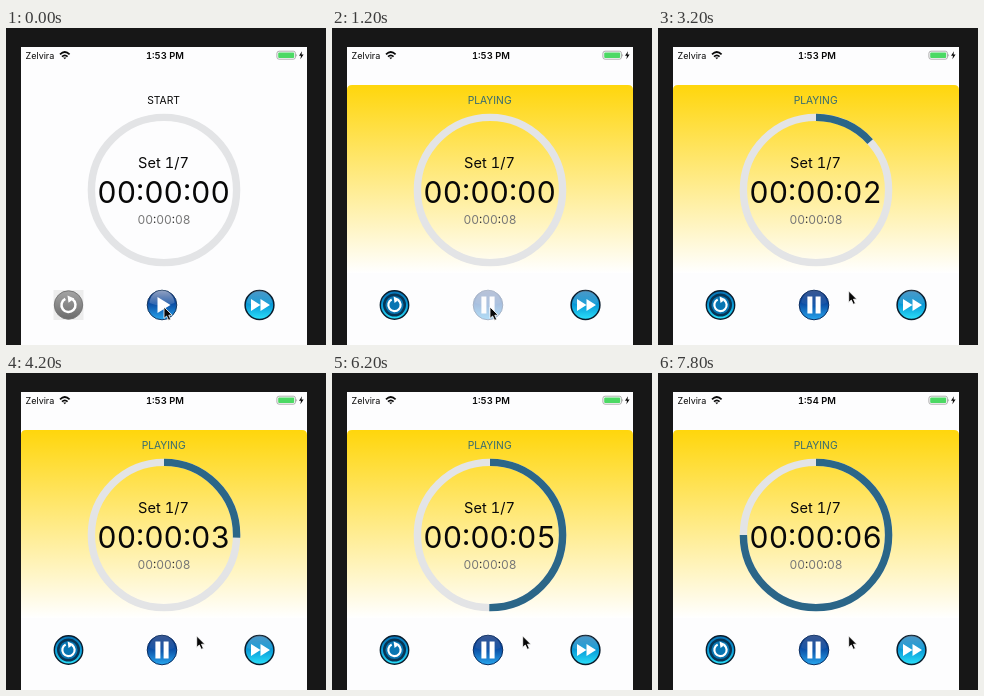
An HTML page that plays this animation: 320 by 317 pixels, repeating every 8 s.

```html
<!DOCTYPE html>
<html lang="en">
<head>
<meta charset="utf-8">
<title>Interval timer</title>
<style>
  html, body { margin: 0; width: 100%; height: 100%; overflow: hidden; background: #171717; }
  svg { display: block; width: 100%; height: 100%; }
  text { font-family: Inter, Roboto, sans-serif; font-variant-numeric: tabular-nums; fill: #080808; }
  .mid { text-anchor: middle; }
  .ring { fill: none; stroke-width: 7.4; }
</style>
</head>
<body>
<svg viewBox="0 0 320 317" preserveAspectRatio="none">
  <defs>
    <linearGradient id="gold" x2="0" y2="1">
      <stop stop-color="#ffd60c"/><stop offset="1" stop-color="#fff"/>
    </linearGradient>
    <linearGradient id="navy" x2="0" y2="1">
      <stop stop-color="#0a2f78"/><stop offset=".45" stop-color="#0b4ca3"/><stop offset="1" stop-color="#27a6ee"/>
    </linearGradient>
    <linearGradient id="cyan" x2="0" y2="1">
      <stop stop-color="#0872b4"/><stop offset=".5" stop-color="#0a9bd8"/><stop offset="1" stop-color="#2be0fa"/>
    </linearGradient>
    <linearGradient id="gray" x2="0" y2="1">
      <stop stop-color="#a4a4a4"/><stop offset="1" stop-color="#6c6c6c"/>
    </linearGradient>
    <linearGradient id="gloss" x2="0" y2="1">
      <stop stop-color="#fff" stop-opacity=".55"/><stop offset="1" stop-color="#fff" stop-opacity=".12"/>
    </linearGradient>
    <path id="shine" d="M-12.5-2A12.5 12.5 0 0 1 12.5-2Q0 3-12.5-2Z" fill="url(#gloss)"/>
    <g id="reload">
      <path d="M-3.2-6.2A7 7 0 1 0 4-5.7" fill="none" stroke="#fff" stroke-width="2.5"/>
      <path d="M-1-9.6L5.8-6.4L0-2.2Z" fill="#fff"/>
    </g>
  </defs>

  <rect width="320" height="317" fill="#171717"/>
  <rect x="15" y="19" width="286" height="298" fill="#fdfdfe"/>
  <path id="panel" d="M15 245V62Q15 57 20 57H296Q301 57 301 62V245Z" fill="url(#gold)"/>

  <text x="19.5" y="30.5" font-size="9">Zelvira</text>
  <g fill="none" stroke="#080808" stroke-width="1.7">
    <path d="M54 26.3Q58.8 21.7 63.6 26.3M56 28.6Q58.8 26 61.6 28.6"/>
    <path d="M57.2 29.4H60.4L58.8 31.2Z" fill="#080808" stroke="none"/>
  </g>
  <text id="clock" class="mid" x="159" y="30.7" font-size="9.4" font-weight="600"></text>
  <rect x="270.9" y="23.2" width="18.6" height="8" rx="2.2" fill="none" stroke="#9b9b9b" stroke-width=".8"/>
  <rect x="272.2" y="24.5" width="16" height="5.4" rx="1" fill="#4cd964"/>
  <path d="M290.4 25.7Q292 27.2 290.4 28.7Z" fill="#9b9b9b"/>
  <path d="M296 23.2L293 27.8H295L294.4 31.2L297.6 26.5H295.5Z" fill="#080808"/>

  <text id="state" class="mid" x="157.6" y="75.7" font-size="10.3"></text>
  <circle class="ring" cx="158" cy="162" r="72.6" stroke="#e3e4e6"/>
  <circle id="arc" class="ring" cx="158" cy="162" r="72.6" stroke="#2b6688" pathLength="360" transform="rotate(-90 158 162)"/>
  <text class="mid" x="157.5" y="139.7" font-size="14.6">Set 1/7</text>
  <text id="count" class="mid" x="157.6" y="175" font-size="30"></text>
  <text class="mid" x="158" y="196" font-size="12" style="fill:#777">00<tspan fill="#222">:</tspan>00<tspan fill="#222">:</tspan>08</text>

  <g transform="translate(62.5 277)">
    <g id="resetOff">
      <rect x="-15" y="-15" width="30" height="30" fill="#ededed"/>
      <circle r="14.2" fill="url(#gray)" stroke="#777" stroke-width="1"/>
      <use href="#reload"/>
    </g>
    <g id="resetOn">
      <circle r="14.2" fill="url(#cyan)" stroke="#0a1c2c" stroke-width="1.4"/>
      <circle r="10.3" fill="#0875b2" stroke="#073555" stroke-width="2.4"/>
      <use href="#reload" transform="scale(.88)"/>
    </g>
  </g>

  <g transform="translate(156 277)">
    <g id="play">
      <circle r="14.8" fill="url(#navy)" stroke="#17385f" stroke-width="1"/>
      <use href="#shine"/>
      <path d="M-4.5-8L8.5 0L-4.5 8Z" fill="#fff"/>
    </g>
    <g id="pause">
      <circle r="14.8" fill="url(#navy)" stroke="#0b2d60" stroke-width="1"/>
      <use href="#shine" opacity=".35"/>
      <path d="M-6.6-8.5H-1.6V8.5H-6.6ZM1.6-8.5H6.6V8.5H1.6Z" fill="#fff"/>
    </g>
  </g>

  <g transform="translate(253.5 277)">
    <circle r="14.4" fill="url(#cyan)" stroke="#0a1c2c" stroke-width="1.5"/>
    <use href="#shine" opacity=".5"/>
    <path d="M-8.5-6L1-.1V-6L10.5 0L1 6V.1L-8.5 6Z" fill="#fff"/>
  </g>

  <g id="press" fill="none">
    <circle cx="158.2" cy="279.4" r="16" stroke="#fff" stroke-width="2.2"/>
    <circle cx="158.2" cy="279.4" r="17.4" stroke="#222"/>
  </g>
  <path id="cursor" d="M0 0V11.4L2.6 9L4.6 13.3L6.7 12.4L4.8 8.2H8.2Z" fill="#080808" stroke="#fff" stroke-width=".8"/>
</svg>
<script>
  const LOOP = 8000, STEP = 200;
  const PRESS = 1000, START = 1200;
  const FIRST_TICK = 2174, TICK = 1005, SWEEP = 250, DEGREES = 45;
  const el = id => document.getElementById(id);
  const show = (id, on) => el(id).style.display = on ? '' : 'none';
  const clamp = v => Math.min(1, Math.max(0, v));

  // cubic-bezier(.25, .1, .25, 1)
  function ease(x) {
    const bezier = (a, b, u) => 3 * a * u * (1 - u) ** 2 + 3 * b * u * u * (1 - u) + u ** 3;
    let low = 0, high = 1;
    for (let i = 0; i < 20; i++) {
      const mid = (low + high) / 2;
      if (bezier(.25, .25, mid) < x) low = mid; else high = mid;
    }
    return bezier(.1, 1, low);
  }

  function draw(now) {
    const t = Math.floor(now % LOOP / STEP) * STEP;
    const playing = t >= START;
    const seconds = Math.max(0, Math.floor((t - FIRST_TICK) / TICK) + 1);
    const sinceTick = t - FIRST_TICK - (seconds - 1) * TICK;
    const angle = seconds ? DEGREES * (seconds - 1 + ease(clamp(sinceTick / SWEEP))) : 0;

    for (const id of ['panel', 'resetOn', 'pause']) show(id, playing);
    for (const id of ['resetOff', 'play']) show(id, !playing);
    show('press', t >= PRESS && !playing);
    show('arc', angle > 0);
    el('arc').setAttribute('stroke-dasharray', `${angle} 360`);
    el('pause').style.opacity = t < START + STEP ? .35 : 1;
    el('play').style.opacity = t >= PRESS ? .9 : 1;

    el('state').textContent = playing ? 'PLAYING' : 'START';
    el('state').style.fill = playing ? '#356a72' : '#080808';
    el('count').textContent = `00:00:0${seconds}`;
    el('clock').textContent = t < 6800 ? '1:53 PM' : '1:54 PM';

    const move = ease(clamp((t - 1300) / 600));
    el('cursor').setAttribute('transform', `translate(${158 + 32.7 * move} ${279 - 16 * move})`);
    requestAnimationFrame(tick);
  }

  const begin = performance.now();
  const tick = () => draw(performance.now() - begin);
  tick();
</script>
</body>
</html>
```
